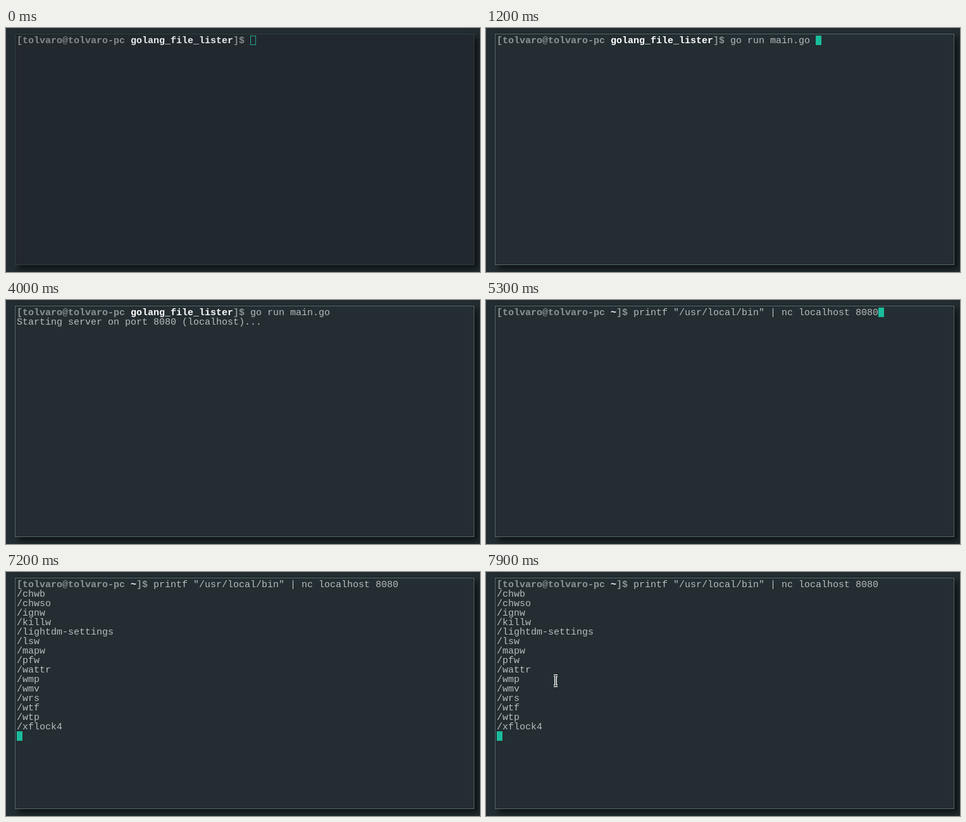
Recreate the animation shown at these times as an HTML page with a canvas. Size 749x386 px, loop 8000 ms.

```html
<!DOCTYPE html>
<html lang="en">
<head>
<meta charset="utf-8">
<title>Terminal session</title>
<style>
html, body { margin: 0; width: 100%; height: 100%; overflow: hidden; background: #222c31; }
canvas { display: block; }
</style>
</head>
<body>
<canvas id="stage" width="749" height="386"></canvas>
<script>
const ctx = document.getElementById('stage').getContext('2d');
const LOOP = 8000, CELL = 9, ROW = 15, LEFT = 17, TOP = 12;
const FONT = '15px "Liberation Mono", monospace';
const USER = '[tolvaro@tolvaro-pc ';

const focused = { back: '#232d32', border: '#56666a', prompt: '#8d9494', dir: '#ffffff', text: '#b9bdbd', cursor: '#1abc9c' };
const blurred = { back: '#21282e', border: '#2e4142', prompt: '#858a8b', dir: '#e9ebec', text: '#adb1b3', cursor: '#1aa98f' };

const project = { dir: 'golang_file_lister', command: '', output: [] };
const running = { ...project, command: 'go run main.go' };
const serving = { ...running, output: ['Starting server on port 8080 (localhost)...'] };
const client = { dir: '~', command: 'printf "/usr/local/bin" | nc localhost 8080', output: [] };
const listing = {
  ...client,
  output: ('chwb chwso ignw killw lightdm-settings lsw mapw pfw wattr ' +
    'wmp wmv wrs wtf wtp xflock4').split(' ').map(name => '/' + name)
};

// start time, screen, cursor [column, row] or null when blinked off
const steps = [
  [0, project, [41, 0]],
  [800, project, null],
  [1200, running, [56, 0]],
  [1700, running, null],
  [2100, running, [0, 1]],
  [2600, serving, null],
  [3200, serving, [0, 2]],
  [4000, serving, null],
  [4300, client, [67, 0]],
  [4800, client, null],
  [5300, client, [67, 0]],
  [5800, client, null],
  [6200, listing, [0, 16]],
  [6700, listing, null],
  [7200, listing, [0, 16]]
];

function write(text, column, row, color, weight = '') {
  ctx.font = `${weight} ${FONT}`;
  ctx.fillStyle = color;
  ctx.fillText(text, LEFT + column * CELL, TOP + 12 + row * ROW);
}

function drawWindow(theme) {
  ctx.fillStyle = '#222c31';
  ctx.fillRect(0, 0, 749, 386);
  ctx.save();
  ctx.shadowColor = 'rgba(0, 0, 0, 0.6)';
  ctx.shadowBlur = 9;
  ctx.shadowOffsetX = ctx.shadowOffsetY = 6;
  ctx.fillStyle = theme.back;
  ctx.fillRect(14, 9, 726, 366);
  ctx.restore();
  ctx.strokeStyle = theme.border;
  ctx.lineWidth = 1;
  ctx.strokeRect(14.5, 9.5, 725, 365);
}

function drawScreen({ dir, command, output }, theme) {
  const end = USER.length + dir.length;
  write(USER, 0, 0, theme.prompt, 'bold');
  write(dir, USER.length, 0, theme.dir, 'bold');
  write(']$', end, 0, theme.prompt, 'bold');
  write(command, end + 3, 0, theme.text);
  output.forEach((line, i) => write(line, 0, i + 1, theme.text));
}

function drawCursor([column, row], theme, solid) {
  const x = LEFT + column * CELL, y = TOP + row * ROW;
  ctx.fillStyle = ctx.strokeStyle = theme.cursor;
  if (solid) ctx.fillRect(x, y, CELL, ROW);
  else ctx.strokeRect(x + 0.5, y + 0.5, CELL - 1, ROW - 1);
}

const arrow = new Path2D('M1 1V17L5 14L8 21L11 19L9 13H13Z');
const beam = new Path2D('M-3 -8H3M0 -8V8M-3 8H3');

function drawPointer(x, y, isArrow) {
  ctx.save();
  ctx.translate(x, y);
  if (isArrow) {
    ctx.fillStyle = '#3d4143';
    ctx.strokeStyle = '#e8e8e8';
    ctx.lineWidth = 1.4;
    ctx.fill(arrow);
    ctx.stroke(arrow);
  } else {
    for (const [color, width] of [['#ffffff', 4], ['#30373a', 1.4]]) {
      ctx.strokeStyle = color;
      ctx.lineWidth = width;
      ctx.stroke(beam);
    }
  }
  ctx.restore();
}

function draw(time) {
  const [, screen, cursor] = steps.findLast(([start]) => start <= time);
  const active = time >= 300 && !(time >= 7600 && time < 7700);
  const theme = active ? focused : blurred;
  drawWindow(theme);
  drawScreen(screen, theme);
  if (cursor) drawCursor(cursor, theme, active);
  if (time >= 7600) {
    // the pointer moves in 100 ms jumps
    const move = Math.floor((time - 7600) / 100) / 3;
    drawPointer(201 - 91 * move, 9 + 163 * move, !active);
  }
}

function tick(now) {
  draw(now % LOOP);
  requestAnimationFrame(tick);
}
draw(0);
requestAnimationFrame(tick);
</script>
</body>
</html>
```
